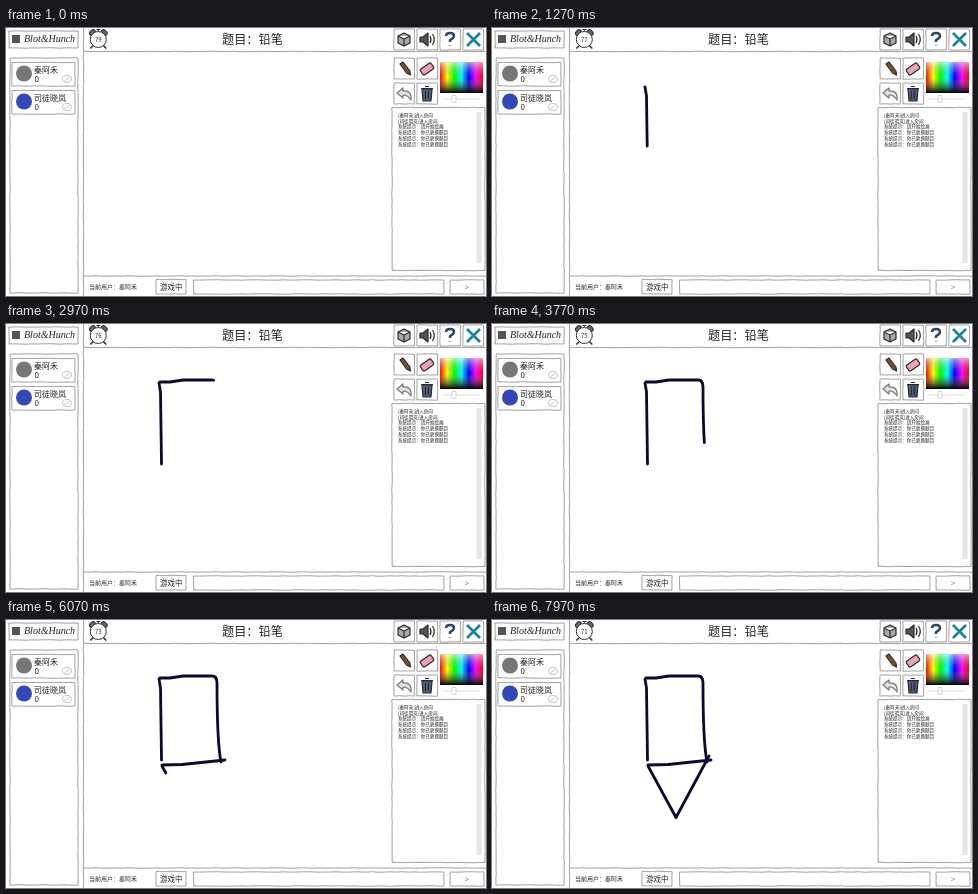
An HTML page for the animation above (8 s loop, 480x268 px).

```html
<!DOCTYPE html>
<html lang="zh">
<head>
<meta charset="utf-8">
<style>
html, body { margin: 0; width: 100%; height: 100%; overflow: hidden; background: #fff; }
svg { display: block; width: 480px; height: 268px; }
text { font-family: "Noto Sans CJK SC", "Noto Sans CJK", "Open Sans", sans-serif; fill: #222; }
.logo { font: italic 10px "Liberation Serif", serif; }
.ink { fill: none; stroke: #0a0a30; stroke-width: 2.8; stroke-linecap: round; stroke-linejoin: round; }
.icons { fill: none; stroke: #2a2a2a; stroke-width: 1.2; stroke-linejoin: round; }
</style>
</head>
<body>
<svg viewBox="0 0 480 268">
  <defs>
    <linearGradient id="hue"></linearGradient>
    <linearGradient id="shade" x2="0" y2="1">
      <stop stop-color="#fff" stop-opacity=".6"/>
      <stop offset=".5" stop-color="#888" stop-opacity="0"/>
      <stop offset="1"/>
    </linearGradient>
  </defs>
  <g id="frames" fill="none" stroke="#808080" stroke-width=".75"></g>

  <rect x="6" y="7" width="8" height="8" fill="#555"/>
  <text class="logo" x="18" y="14">Blot&amp;Hunch</text>

  <g transform="translate(92.3 11.5)" fill="#fff" stroke="#333">
    <path d="M-5 6L-8 9M5 6L8 9" stroke-width="1.6"/>
    <ellipse cx="-6" cy="-7" rx="3.3" ry="2.2" transform="rotate(-40 -6 -7)" fill="#666"/>
    <ellipse cx="6" cy="-7" rx="3.3" ry="2.2" transform="rotate(40 6 -7)" fill="#666"/>
    <path d="M0 -8V-10M-2 -10H2"/>
    <circle r="8"/>
    <text id="count" y="2.200" font-size="6" text-anchor="middle" stroke="none"></text>
  </g>

  <!-- die, speaker, help, close -->
  <g class="icons">
    <path d="M398 5L404 8V15L398 18L392 15V8ZM392 8L398 11L404 8M398 11V18" fill="#aaa"/>
    <path d="M414 9H417L422 5V18L417 14H414Z" fill="#555"/>
    <path d="M424 8Q426 11.500 424 15M426.500 6Q430 11.500 426.500 17"/>
    <path d="M440 8Q440 5 444 5Q448 5 448 8Q448 10 444 12V14M444 17V17.500" stroke="#2b4574" stroke-width="2.400"/>
    <path d="M461 5L474 18M474 5L461 18" stroke="#1a84a2" stroke-width="2.800"/>
  </g>

  <!-- pencil, eraser, undo, bin -->
  <g class="icons">
    <path d="M394 36L397 34L404 43L404.500 47L400.500 45Z" fill="#80502c"/>
    <rect x="-6.500" y="-3.500" width="13" height="7" rx="1.500" transform="translate(421 41) rotate(-35)" fill="#f0a0b4"/>
    <path d="M391 65L397 60V63Q406 62 405 72Q402 67 397 67V70Z" fill="#e4e4e4" stroke="#777"/>
    <path d="M416 61H426L425 73H417ZM415 60.500H427M419 58.500H423M419.500 63V71M422.500 63V71" fill="#4d6080"/>
  </g>
  <rect x="434" y="34" width="43" height="31" fill="url(#hue)"/>
  <rect x="434" y="34" width="43" height="31" fill="url(#shade)"/>
  <path d="M436 71H474" stroke="#ddd"/>
  <rect x="446" y="67.500" width="4" height="7" rx="1" fill="#fff" stroke="#bbb" stroke-width=".7"/>
  <rect x="470.500" y="84" width="5" height="151" fill="#e6e6e6"/>

  <text x="216" y="15.500" font-size="12.200">题目：铅笔</text>
  <g id="players"></g>
  <g id="chat" font-size="4.550"></g>
  <text id="user" x="83" y="261.300" font-size="6"></text>
  <text x="154" y="262" font-size="7.500">游戏中</text>
  <text x="461" y="261.800" font-size="8" text-anchor="middle" style="fill:#888">&gt;</text>
  <g id="ink" class="ink"></g>
</svg>
<script>
const $ = id => document.getElementById(id);
const fill = (id, items, make) => $(id).innerHTML = items.map(make).join("");
const users = ["秦阿禾", "司徒晓岚"];

// hand-drawn outlines
let seed = 7;
const rand = () => (seed = seed * 16807 % 2147483647) / 2147483647;
const wobble = () => (rand() - .5) * .5;
function line(x, y, dx, dy) {
  const n = Math.ceil(Math.hypot(dx, dy) / 6);
  return "M" + Array.from({ length: n + 1 }, (_, i) =>
    [x + dx * i / n + wobble(), y + dy * i / n + wobble()]).join("L");
}
const box = (x, y, w, h) =>
  line(x, y, w, 0) + line(x + w, y, 0, h) + line(x, y + h, w, 0) + line(x, y, 0, h);

let outline = box(3, 3, 69, 17) + box(4, 30, 68, 235) + box(386, 79.5, 93, 163) +
  box(150, 251.5, 30, 14.5) + box(187.5, 252, 250.5, 14) + box(444, 252, 34, 14) +
  line(77.5, 0, 0, 268) + line(78, 23.5, 402, 0) + line(78, 248, 402, 0);
for (let i = 0; i < 4; i++) {
  outline += box(388 + 23 * i, 1, 20.5, 21);
  outline += box(388 + 23 * (i % 2), i < 2 ? 30 : 55, 20.5, 21);
}
users.forEach((_, i) => outline += box(6, 34.5 + 28 * i, 63, 23.5));
$("frames").innerHTML = `<path d="${outline}"/>`;

fill("hue", [0, 1, 2, 3, 4, 5, 6], i => `<stop offset="${i / 6}" stop-color="hsl(${i * 60} 100% 50%)"/>`);

fill("players", users, (name, i) => `<g transform="translate(0 ${34 + 28 * i})">
  <circle cx="18" cy="11.5" r="8" fill="${i ? "#3348b8" : "#777"}"/>
  <text x="28" y="10.600" font-size="8">${name}</text>
  <text x="28.5" y="20" font-size="8">0</text>
  <g fill="none" stroke="#aaa" stroke-width=".7">
    <ellipse cx="61" cy="17" rx="4.5" ry="3.5"/><path d="M58 19.500L64 14.500"/>
  </g></g>`);

const tips = ["请开始绘画", ...Array(3).fill("你已更换题目")];
fill("chat", [...users.map(u => `[${u}]进入房间`), ...tips.map(s => "系统提示：" + s)],
  (s, i) => `<text x="392" y="${88.700 + 5.800 * i}">${s}</text>`);
$("user").textContent = "当前用户：" + users[0];

// pen strokes: begin and end in ms, then the shape
const strokes = [
  [600, 1750, "M153 59L154.5 68L155.5 140"],
  [2450, 4350, "M154 58H164L177 56H206Q211 56 211 63Q211 122 215 142"],
  [4570, 5420, "M156 145L176 144.500L219 140"],
  [6000, 6750, "M156 146L184 197.500"],
  [7130, 7900, "M184 197.500Q202 164 217 136"]
];
fill("ink", strokes, ([, , d]) => `<path d="${d}" pathLength="1"/>`);
const pens = [...$("ink").children];
const easeOut = u => 1 - (1 - u) ** 1.5;

const start = performance.now();
function draw(now) {
  const ms = Math.max(0, now - start) % 8000;
  const shift = ms < 870 ? 0 : 70;
  const t = Math.floor((ms - shift) / 100) * 100 + shift; // ten steps a second
  pens.forEach((pen, i) => {
    const [from, to] = strokes[i];
    const u = Math.min(1, Math.max(0, (t - from) / (to - from)));
    pen.style.visibility = u ? "visible" : "hidden";
    pen.setAttribute("stroke-dasharray", u < 1 ? easeOut(u) + " 2" : "none");
  });
  $("count").textContent = 79 - Math.floor((t + 830) / 1000);
  requestAnimationFrame(draw);
}
draw(start);
</script>
</body>
</html>
```
